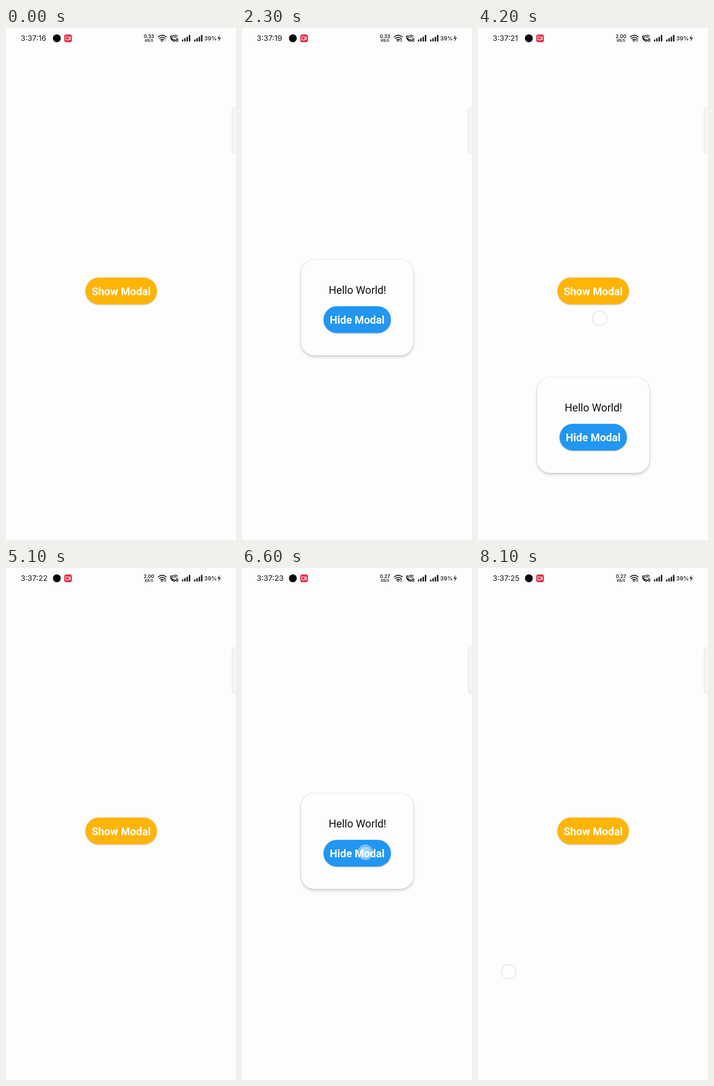
An HTML page that plays this animation: 502 by 1115 pixels, repeating every 8.2 s.

```html
<!DOCTYPE html>
<html lang="en">
<head>
<meta charset="utf-8">
<title>Modal demo</title>
<style>
  html, body { margin: 0; width: 100%; height: 100%; overflow: hidden; background: #fefdfe; }
  svg { display: block; width: 502px; height: 1115px; }
  .label { font: 23.3px Roboto, sans-serif; text-anchor: middle; fill: #111; }
  .bold { font-weight: 700; fill: #fff; }
  .status { font-family: Inter, sans-serif; fill: #151515; }
  .middle { text-anchor: middle; font-weight: 600; }
  .raised { filter: drop-shadow(0 1.5px 1.5px rgba(0, 0, 0, .28)); }
  .floating { filter: drop-shadow(0 0 1px rgba(0, 0, 0, .16)) drop-shadow(0 3px 3px rgba(0, 0, 0, .2)); }
  .line { fill: none; stroke: #151515; stroke-linecap: round; }
</style>
</head>
<body>
<svg viewBox="0 0 502 1115">
  <defs>
    <radialGradient id="glow">
      <stop offset=".7" stop-color="#fff" stop-opacity=".6"/>
      <stop offset=".88" stop-color="#fff" stop-opacity=".28"/>
      <stop offset="1" stop-color="#fff" stop-opacity=".2"/>
    </radialGradient>
    <g id="bars" fill="#151515">
      <rect y="25" width="3" height="4.5" rx="1"/>
      <rect x="5" y="22" width="3" height="7.5" rx="1"/>
      <rect x="10" y="19" width="3" height="10.5" rx="1"/>
      <rect x="15" y="15" width="3.2" height="14.5" rx="1"/>
    </g>
  </defs>
  <rect width="502" height="1115" fill="#fefdfe"/>

  <!-- Status bar -->
  <text id="clock" class="status" x="32" y="28" font-size="16.5"></text>
  <circle cx="111" cy="22.3" r="8.6" fill="#050505"/>
  <rect x="127" y="14" width="17" height="17" rx="4.5" fill="#e5344e"/>
  <g fill="none" stroke="#fff" stroke-width="1.2" stroke-linejoin="round">
    <rect x="130.3" y="19" width="7" height="6.8" rx="1"/>
    <path d="M137.3 21.3l3.4-1.8v5.8l-3.4-1.8"/>
  </g>
  <text id="speed" class="status middle" x="312" y="22" font-size="10.3"></text>
  <text class="status middle" x="312" y="30" font-size="7.6">KB/S</text>
  <g class="line" stroke-width="2">
    <path d="M332.5 19.3Q341 12.2 349.5 19.3"/>
    <path d="M335 22.8Q341 17.8 347 22.8"/>
    <path d="M337.6 26Q341 23.2 344 26"/>
  </g>
  <circle cx="340.5" cy="28.2" r="1.5" fill="#151515"/>
  <path id="traffic" d="M345.4 25.6l2.2-2.6 2.2 2.6zM345.4 27.4l2.2 2.6 2.2-2.6z" fill="#151515"/>
  <g class="line">
    <path d="M359.5 17.2q-1.7 3 1.2 7t7.2 5l2-2.2-3.1-2.1-1.8 1q-2.6-1.5-3.4-4l1.3-1.7-1.5-3.1z" stroke-width="1.7" stroke-linejoin="round"/>
    <path d="M364 17.4q5.2-3.7 10 0M366 20.2q3-2.2 6 0" stroke-width="1.6"/>
    <rect x="371.7" y="23.6" width="3.4" height="5.2" rx=".6" stroke-width="1.6"/>
  </g>
  <use href="#bars" x="384"/>
  <use href="#bars" x="410.5"/>
  <text class="status" x="432.5" y="26.5" font-size="12.3" font-weight="500">39%</text>
  <path d="M466.3 15l-5 8.3h3.8z" fill="#999"/>
  <path d="M466.3 15l-1.2 6h4.2l-5.8 9.3 1.6-7h-3.8z" fill="#444"/>

  <rect x="493.5" y="172.5" width="24" height="102" rx="8" fill="#f5f4f5" stroke="#dddcdd"/>

  <rect class="raised" x="173.5" y="543.5" width="155.8" height="58.3" rx="29" fill="#ffb406"/>
  <text class="label bold" x="251.4" y="582">Show Modal</text>

  <g id="modal">
    <rect class="floating" x="129" y="491" width="245" height="208" rx="29" fill="#fefdfe"/>
    <text class="label" x="252" y="565">Hello World!</text>
    <rect class="raised" x="178" y="592" width="147" height="58.3" rx="29" fill="#2196f3"/>
    <text class="label bold" x="251.4" y="630">Hide Modal</text>
  </g>

  <circle id="touch" r="15.7" fill="url(#glow)" stroke="#d5dde8" stroke-opacity=".65" stroke-width="2"/>
</svg>
<script>
  const DURATION = 8200, STEP = 100;

  // Each row: start time in ms, then the value held from there on.
  const modalSteps = [
    [0, null], [2300, 14], [2400, 0], [4200, 270], [4300, null],
    [5600, 393], [5700, 20], [5800, 0], [6700, 74], [6800, null]
  ];
  const touchSteps = [
    [0, null], [2100, [265, 580]], [2200, null],
    [4100, [265.5, 632.3]], [4300, null],
    [5300, [265, 580]], [5500, null],
    [6600, [269.3, 619.3]], [6800, null],
    [7300, [78, 883.5]], [7500, null],
    [8100, [67, 879.3]]
  ];
  const speedSteps = [[0, '0.33'], [2600, '2.00'], [6600, '0.27']];

  const [clock, speed, traffic, modal, touch] =
    ['clock', 'speed', 'traffic', 'modal', 'touch'].map(id => document.getElementById(id));

  const valueAt = (steps, t) => steps.findLast(([start]) => start <= t)[1];

  function place(node, position) {
    node.style.display = position ? '' : 'none';
    if (position) node.setAttribute('transform', `translate(${position})`);
  }

  function render(now) {
    const t = Math.floor(now % DURATION / STEP) * STEP;
    const seconds = t < 100 ? 16 : 17 + Math.floor(t / 1000);
    const offset = valueAt(modalSteps, t);
    clock.textContent = `3:37:${seconds}`;
    speed.textContent = valueAt(speedSteps, t);
    traffic.style.opacity = t < 100 ? .3 : 1;
    place(modal, offset === null ? null : [0, offset]);
    place(touch, valueAt(touchSteps, t));
  }

  const origin = performance.now();
  function tick() {
    render(performance.now() - origin);
    requestAnimationFrame(tick);
  }
  tick();
</script>
</body>
</html>
```
